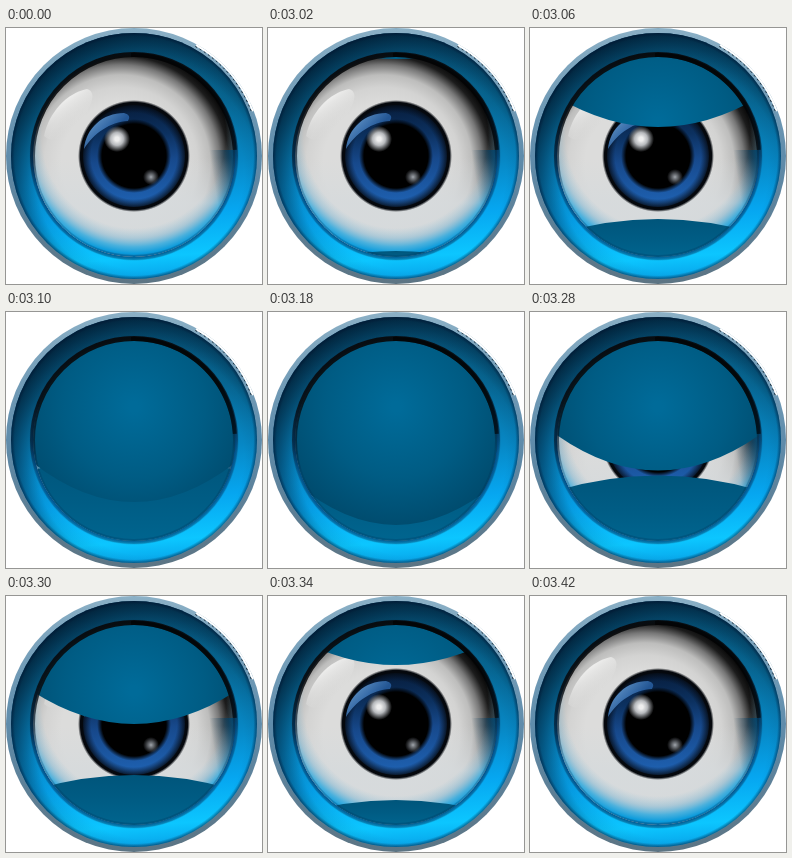
Animation, 256 px wide and 256 px high, one loop 3.52 s. Source, as an HTML page with a canvas:

```html
<!DOCTYPE html>
<html lang="en">
<head>
<meta charset="utf-8">
<title>Blinking eye</title>
<style>
  html, body { margin: 0; width: 100%; height: 100%; overflow: hidden; background: #fff; }
  canvas { display: block; width: 256px; height: 256px; }
</style>
</head>
<body>
<canvas id="stage" width="256" height="256"></canvas>
<script>
const ctx = document.getElementById('stage').getContext('2d');
const LOOP = 3520, STEP = 20, BLINK_START = 3020, BLINK_END = 3420;
const C = 128, SOCKET = 101;

// [time, upper lid edge, lower lid edge], both measured on the centre line
const BLINK = [
  [3020, 31, 223], [3040, 58, 211], [3060, 99, 191], [3080, 147, 165],
  [3100, 190, 143], [3120, 206, 140], [3160, 214, 140], [3240, 210, 140],
  [3260, 189, 148], [3300, 128, 179], [3340, 69, 204], [3360, 49, 213],
  [3380, 37, 219], [3400, 31, 223], [3420, 27, 229]
];

function disc(x, y, r, fill) {
  ctx.beginPath();
  ctx.arc(x, y, r, 0, Math.PI * 2);
  ctx.fillStyle = fill;
  ctx.fill();
}

function arc(r, width, stroke, from = 0, to = Math.PI * 2) {
  ctx.beginPath();
  ctx.arc(C, C, r, from, to);
  ctx.lineWidth = width;
  ctx.strokeStyle = stroke;
  ctx.stroke();
}

function shade(gradient, stops) {
  for (const [at, color] of stops) gradient.addColorStop(at, color);
  return gradient;
}
const radial = (x, y, r0, r1, ...stops) =>
  shade(ctx.createRadialGradient(x, y, r0, x, y, r1), stops);
const linear = (x0, y0, x1, y1, ...stops) =>
  shade(ctx.createLinearGradient(x0, y0, x1, y1), stops);

function clipped(r, draw) {
  ctx.save();
  ctx.beginPath();
  ctx.arc(C, C, r, 0, Math.PI * 2);
  ctx.clip();
  draw();
  ctx.restore();
}

function drawRing() {
  disc(C, C, 128, linear(0, 0, 0, 256, [0, '#8bb0c6'], [0.5, '#5f8cab'], [1, '#5c7483']));
  disc(C, C, 123, linear(110, 5, 128, 250,
    [0, '#06547a'], [0.3, '#076a97'], [0.55, '#0787c4'], [0.75, '#06a6f0'], [0.92, '#0cc6ff'], [1, '#08a8ec']));
  // the outer side is darkest at the upper left
  disc(C, C, 123, radial(140, 145, 98, 142,
    [0, 'rgba(0,20,40,0)'], [0.3, 'rgba(0,20,40,.08)'], [1, 'rgba(0,20,40,.75)']));
  disc(C, C, 123, radial(C, C, 99, 123,
    [0, 'rgba(0,30,80,.8)'], [0.1, 'rgba(0,40,100,.5)'], [0.25, 'rgba(0,30,60,0)'],
    [0.85, 'rgba(0,20,50,0)'], [1, 'rgba(0,20,50,.5)']));

  arc(127, 2, '#fff', -1.06, -0.36);
  ctx.setLineDash([2, 3]);
  arc(125.5, 1, '#10202c', -1.06, -0.36);
  ctx.setLineDash([]);
}

function drawIris() {
  disc(C, C, 56, radial(C, C, 50, 56, [0, '#05080d'], [0.6, '#05080d'], [1, 'rgba(5,8,13,0)']));
  disc(C, C, 51, linear(122, 77, 128, 179,
    [0, '#071d3c'], [0.3, '#0c3160'], [0.55, '#17498c'], [1, '#1f63b4']));
  disc(C, C, 52, radial(C, C, 43, 52, [0, 'rgba(5,12,25,0)'], [1, 'rgba(5,8,13,.9)']));
  disc(C, C, 37, radial(C, C, 28, 37, [0, '#000'], [0.45, '#000'], [1, 'rgba(0,0,0,0)']));
  // glossy patch on the upper left of the iris
  ctx.beginPath();
  ctx.moveTo(78, 121);
  ctx.bezierCurveTo(80, 100, 97, 85, 118, 85);
  ctx.quadraticCurveTo(126, 87, 122, 93);
  ctx.bezierCurveTo(104, 94, 88, 105, 78, 121);
  ctx.fillStyle = linear(86, 88, 104, 106, [0, '#6ba0d4'], [1, 'rgba(44,102,172,.75)']);
  ctx.fill();
  disc(111, 111, 13, radial(111, 111, 2, 13,
    [0, '#eee'], [0.4, 'rgba(215,218,222,.85)'], [1, 'rgba(200,205,212,0)']));
  disc(145, 149, 8, radial(145, 149, 0, 8,
    [0, 'rgba(170,175,182,.95)'], [0.4, 'rgba(130,135,142,.7)'], [1, 'rgba(110,115,125,0)']));
}

function drawBall() {
  disc(C, C, SOCKET, radial(115, 136, 60, 116,
    [0, '#dcdcdb'], [0.3, '#d3d3d2'], [0.52, '#bdbdbc'], [0.7, '#777'], [0.86, '#1c1c1c'], [1, '#050505']));
  // pale lower half, then blue light bounced up from the ring
  disc(C, C, SOCKET, linear(0, 130, 0, 175, [0, 'rgba(214,218,220,0)'], [1, 'rgba(214,218,220,.9)']));
  disc(C, C, SOCKET, radial(C, 108, 92, 121,
    [0, 'rgba(150,195,215,0)'], [0.35, 'rgba(120,180,210,.45)'],
    [0.65, 'rgba(50,170,222,.85)'], [0.88, '#0a9bdc'], [1, '#0778b4']));
  ctx.fillStyle = linear(203, 122, 228, 118,
    [0, 'rgba(0,60,98,0)'], [0.5, 'rgba(0,60,98,.35)'], [1, 'rgba(0,72,115,.95)']);
  ctx.fillRect(200, 122, 32, 70);
  // white gloss with a crisp edge
  ctx.beginPath();
  ctx.moveTo(38, 108);
  ctx.bezierCurveTo(43, 84, 61, 65, 81, 61);
  ctx.bezierCurveTo(92, 64, 84, 80, 76, 92);
  ctx.bezierCurveTo(66, 106, 49, 118, 38, 108);
  ctx.fillStyle = linear(57, 73, 74, 96, [0, '#efefee'], [1, 'rgba(218,218,217,0)']);
  ctx.fill();
  drawIris();
}

function lidPath(edge, radius, outerY) {
  const sag = 128 * 128 / (2 * radius);
  const sideY = edge + (outerY < C ? -sag : sag);
  ctx.beginPath();
  ctx.moveTo(0, outerY);
  ctx.lineTo(0, sideY);
  ctx.quadraticCurveTo(C, 2 * edge - sideY, 256, sideY);
  ctx.lineTo(256, outerY);
  ctx.closePath();
}

function drawLids(upper, lower) {
  lidPath(lower, 340, 256);
  ctx.fillStyle = linear(0, lower, 0, 230, [0, '#00557b'], [0.5, '#005c84'], [1, '#00658f']);
  ctx.fill();
  lidPath(upper, 185 - (upper - 69) * 0.45, 0);
  ctx.fillStyle = radial(C, 95, 5, 125, [0, '#006b99'], [0.55, '#005c84'], [1, '#004a6c']);
  ctx.fill();
}

function drawSocketEdge() {
  arc(101.5, 5, linear(116, 26, 128, 150,
    [0, 'rgba(8,10,12,.95)'], [0.45, 'rgba(8,10,12,.85)'], [0.8, 'rgba(4,25,45,.6)'], [1, 'rgba(0,45,85,.25)']));
  arc(101, 4, 'rgba(0,0,0,.6)', -1.6, -0.06);
}

function lidsAt(time) {
  const t = Math.floor(time / STEP) * STEP;
  if (t < BLINK_START || t >= BLINK_END) return null;
  const i = BLINK.findIndex(key => key[0] > t);
  const a = BLINK[i - 1], b = BLINK[i];
  const k = (t - a[0]) / (b[0] - a[0]);
  return [1, 2].map(n => a[n] + (b[n] - a[n]) * k);
}

function render(time) {
  ctx.clearRect(0, 0, 256, 256);
  drawRing();
  const lids = lidsAt(time);
  clipped(SOCKET, () => {
    drawBall();
    if (lids) drawLids(...lids);
  });
  drawSocketEdge();
}

const start = performance.now();
function tick() {
  render((performance.now() - start) % LOOP);
  requestAnimationFrame(tick);
}
tick();
</script>
</body>
</html>
```
